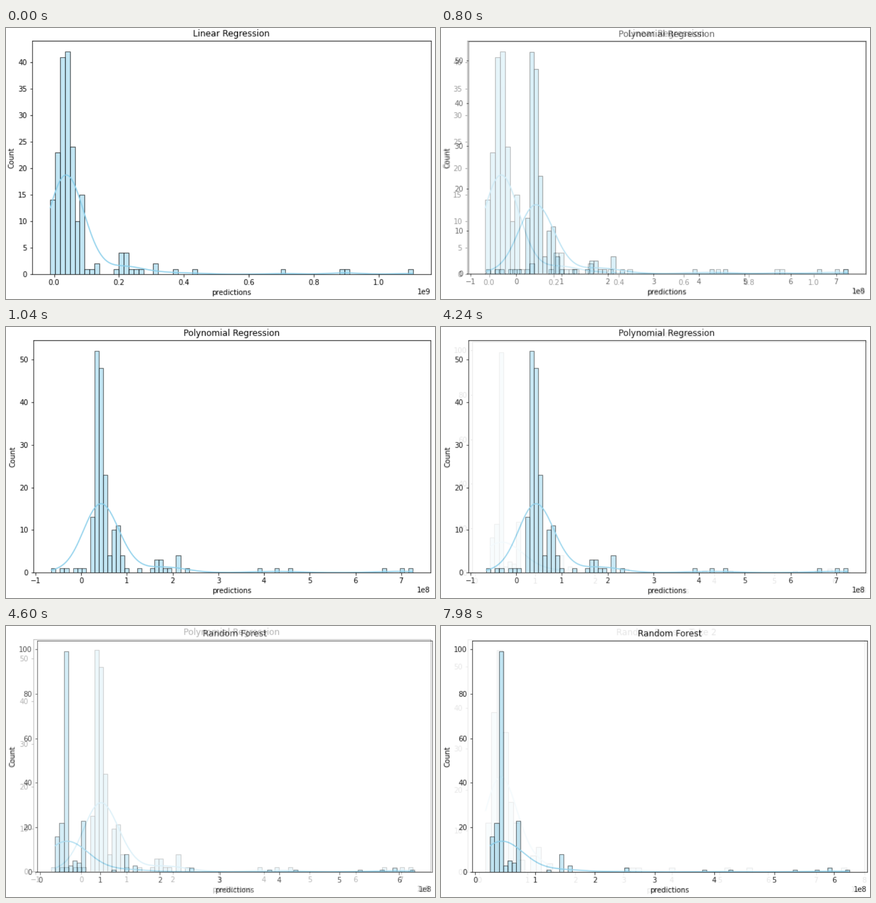
A matplotlib script for the animation above (8000 ms loop, 901 px wide and 568 px high).

```python
import matplotlib.pyplot as plt
import numpy as np
from matplotlib.animation import FuncAnimation

W, H, DPI = 901, 568, 64
K = 72 / DPI  # size of one pixel in points
AX_L, AX_B, AX_W, AX_H = 90, 54, 558, 326.16  # axes in the chart's own pixels
STEP, LOOP = 20, 8000
FADE_STEP, FADE_COUNT = 60, 10
FADES = (500, 4240, 7980)

plt.rcParams.update({
    "font.family": "DejaVu Sans",
    "font.size": 10 * K,
    "axes.linewidth": 0.8 * K,
    "axes.titlepad": 6 * K,
    "axes.labelpad": 4 * K,
    "lines.linewidth": 1.5 * K,
    **{f"{a}tick.major.{p}": v * K for a in "xy"
       for p, v in (("size", 3.5), ("pad", 3.5), ("width", 0.8))},
})

# box: axes on the stage (left, top, right, bottom); span: data range
# lumps: (centre bin, height, spread); singles: bins holding one stray value
CHARTS = [
    dict(title="Linear Regression", box=(55, 26.5, 892.5, 516),
         span=(-0.0117e9, 1.106e9), bins=74,
         lumps=[(0, 6.5, 0.3), (2.51, 44.56, 1.326), (5.85, 14, 0.46),
                (8.85, 1.9, 0.55), (14.5, 4.7, 0.85), (17.5, 1, 0.7)],
         singles=(21, 21, 25, 29, 47, 59, 60, 73)),
    dict(title="Polynomial Regression", box=(57.5, 27.5, 891.5, 514.5),
         span=(-0.652e8, 7.246e8), bins=84,
         lumps=[(10.139, 51.8, 0.69), (11.46, 33.5, 0.562),
                (14.586, 12.3, 0.97), (24.5, 3.6, 0.9), (29, 4, 0.3)],
         singles=(0, 2, 3, 5, 6, 7, 20, 27, 31, 48, 52, 55, 77, 81, 83)),
    dict(title="Random Forest", box=(65.5, 30.5, 895, 515.5),
         span=(0.2486e8, 6.257e8), bins=83,
         lumps=[(0, 16, 0.3), (1.801, 109.3, 0.447), (4.4, 6, 0.6),
                (6, 22.7, 0.3), (16, 8, 0.3), (18, 3, 0.3)],
         singles=(13, 31, 31, 49, 55, 70, 75, 78, 78, 82)),
    dict(title="Random Forest - Take 2", box=(56, 28, 889.5, 515.5),
         span=(0.1375e8, 7.632e8), bins=65,
         lumps=[(1.88, 54.3, 1.085), (4.6, 12.5, 0.8), (8.6, 7.6, 0.55)],
         singles=(11, 11, 25, 26, 27, 33, 43, 47, 64)),
]

fig = plt.figure(figsize=(W / DPI, H / DPI), dpi=DPI, facecolor="white")


def grab():
    fig.canvas.draw()
    return np.array(fig.canvas.buffer_rgba())[..., :3] / 255


def show(pixels, extent, interpolation):
    """Fill the stage with an image laid out in stage pixels."""
    fig.clear()
    ax = fig.add_axes([0, 0, 1, 1])
    ax.axis("off")
    img = ax.imshow(pixels, extent=extent, aspect="auto",
                    interpolation=interpolation)
    ax.set(xlim=(0, W), ylim=(H, 0))
    return img


def histogram(bins, lumps, singles):
    i = np.arange(bins)
    bell = sum(h * np.exp(-((i - c) / s) ** 2 / 2) for c, h, s in lumps)
    return np.rint(bell).astype(int) + np.bincount(singles, minlength=bins)


def density(counts):
    """Gaussian KDE with Scott bandwidth, in bin units, scaled to counts."""
    mid = np.arange(len(counts)) + 0.5
    bw = np.sqrt(np.cov(mid, fweights=counts)) * counts.sum() ** -0.2
    x = np.linspace(0, len(counts), 200)
    z = (x[:, None] - mid) / bw
    return x, np.exp(-z * z / 2) @ counts / (bw * np.sqrt(2 * np.pi))


def render(title, box, span, bins, lumps, singles):
    """Plot one chart at its own size, then enlarge it onto the stage."""
    fig.clear()
    ax = fig.add_axes([AX_L / W, AX_B / H, AX_W / W, AX_H / H])
    lo, hi = span
    width = (hi - lo) / bins
    counts = histogram(bins, lumps, singles)
    used = np.flatnonzero(counts)
    ax.bar(lo + used * width, counts[used], width, align="edge",
           facecolor=("skyblue", 0.5), edgecolor="black",
           linewidth=0.1 * AX_W / 1.1 / bins * K)
    x, y = density(counts)
    ax.plot(lo + x * width, y, color="skyblue")
    ax.xaxis.OFFSETTEXTPAD = 3 * K
    ax.set(title=title, xlabel="predictions", ylabel="Count")
    chart = grab()

    l, t, r, b = box
    sx, sy = (r - l) / AX_W, (b - t) / AX_H
    left, bottom = l - AX_L * sx, b + AX_B * sy
    show(chart, (left, left + W * sx, bottom, bottom - H * sy), "bilinear")
    return grab()


pages = [render(**c) for c in CHARTS]
view = show(pages[0], (0, W, H, 0), "nearest")


def update(i):
    t = i * STEP
    page, mix = 0, 0.0
    for k, start in enumerate(FADES):
        if t >= start:
            page = k
            mix = min((t - start) // FADE_STEP + 1, FADE_COUNT) / FADE_COUNT
    view.set_data(pages[page] * (1 - mix) + pages[page + 1] * mix)
    return [view]


anim = FuncAnimation(fig, update, frames=LOOP // STEP, interval=STEP,
                     repeat=True, repeat_delay=0, blit=False)
plt.show()
```
